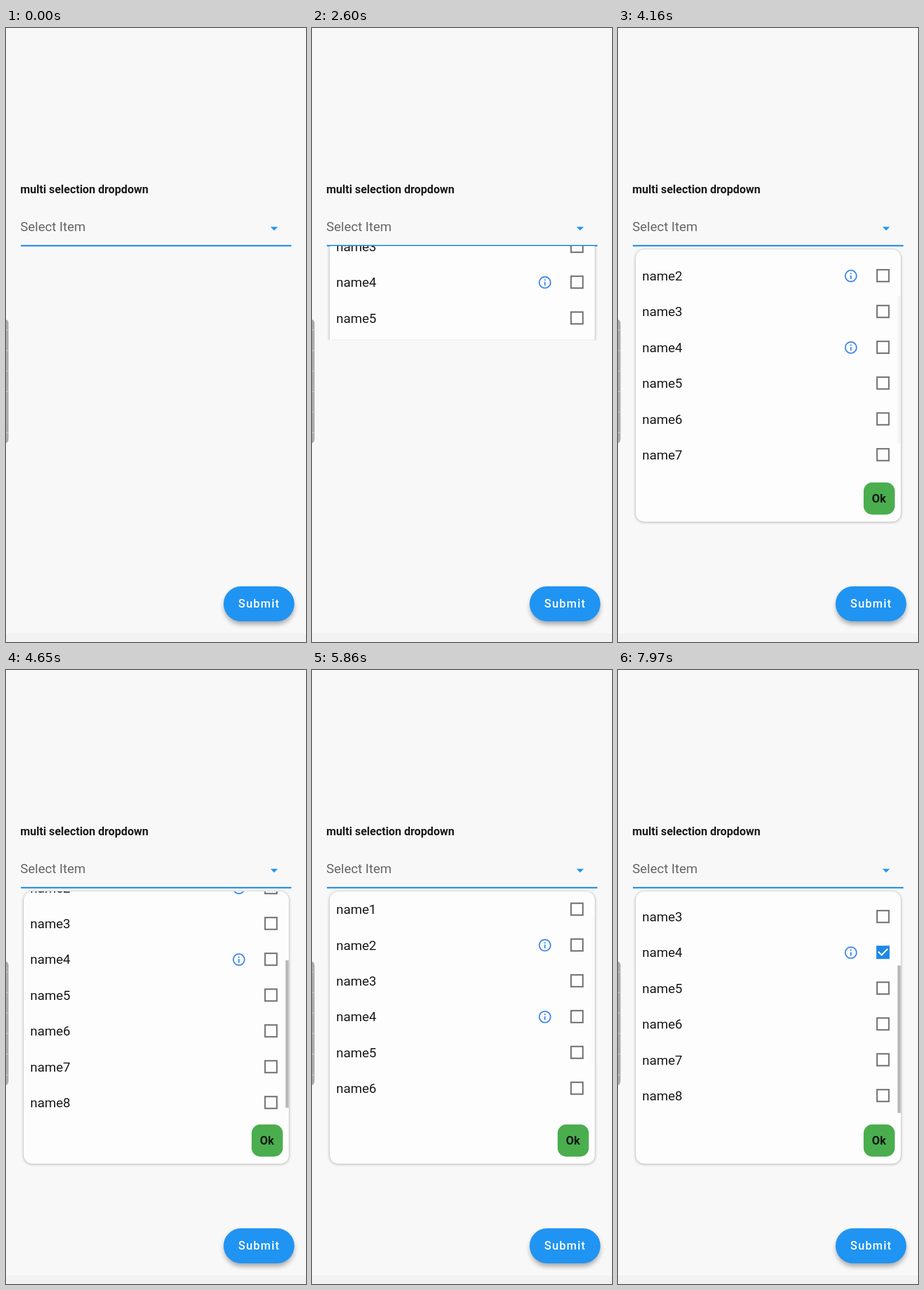
An HTML page that plays this animation: 524 px wide and 1070 px high, repeating every 8 s.

```html
<!DOCTYPE html>
<html lang="en">
<head>
<meta charset="utf-8">
<title>Multi selection dropdown</title>
<style>
  html, body { margin: 0; width: 100%; height: 100%; overflow: hidden; background: #f8f8f9; }
  svg { display: block; width: 100%; height: 100%; }
  text { font-family: Roboto, "Noto Sans", sans-serif; fill: #1b1b1b; }
</style>
</head>
<body>
<svg viewBox="0 0 524 1070" preserveAspectRatio="none">
  <defs>
    <filter id="soft" x="-20%" y="-20%" width="140%" height="140%"><feGaussianBlur stdDeviation="2.5"/></filter>
    <filter id="lift" x="-30%" y="-50%" width="160%" height="200%"><feGaussianBlur stdDeviation="4.5"/></filter>
    <clipPath id="reveal"><rect id="revealBox" x="26" y="380" width="472.5" height="0"/></clipPath>
    <clipPath id="view"><rect x="31" y="386" width="463" height="386"/></clipPath>
    <clipPath id="card"><rect x="31" y="386" width="463" height="474.5" rx="15"/></clipPath>
  </defs>

  <rect width="524" height="1070" fill="#f8f8f9"/>
  <rect y="1055" width="524" height="15" fill="#f2f2f2"/>

  <path d="M0 508Q4.5 509 4.5 516V715Q4.5 722 0 723.5Z" fill="#ababab"/>
  <path d="M0 526.5H4.5M0 562H4.5M0 598H4.5M0 633.5H4.5M0 705.5H4.5" stroke="#d6d6d6"/>
  <path id="notch" d="M0 669.5H4.5" stroke="#d6d6d6"/>

  <text x="25" y="288" font-size="19.7" font-weight="700">multi selection dropdown</text>
  <text x="25" y="354" font-size="22.8" style="fill:#666">Select Item</text>
  <path d="M462 346.5H474.7L468.3 352.9Z" fill="#2196f3"/>
  <rect x="26" y="378" width="472.5" height="2.7" fill="#2a92e8"/>

  <g clip-path="url(#reveal)">
    <g id="panel">
      <rect x="31" y="387" width="463" height="474" rx="15" fill="#888" opacity=".8" filter="url(#soft)"/>
      <rect x="31" y="386" width="463" height="474.5" rx="15" fill="#fdfdfd"/>
      <g clip-path="url(#view)">
        <g id="list"></g>
        <rect id="bar" x="488.3" width="5.4" height="257" fill="#000"/>
      </g>
      <g clip-path="url(#card)"><ellipse id="glow" rx="695" fill="#2196f3"/></g>
      <rect x="429" y="792" width="54.5" height="56" rx="15" fill="#4aae4e"/>
      <text x="443.6" y="826.5" font-size="20" font-weight="700" style="fill:#0e150e">Ok</text>
    </g>
  </g>

  <rect x="381" y="979" width="122" height="60" rx="30" fill="#000" opacity=".33" filter="url(#lift)"/>
  <rect x="380" y="973" width="123.7" height="61" rx="30.5" fill="#2094f2"/>
  <text x="405.8" y="1010" font-size="20" font-weight="500" letter-spacing="1.5" style="fill:#fff">Submit</text>
</svg>
<script>
const LOOP = 8000, ROW = 62.4, FULL = 486, MAX_SCROLL = 112;
const BOX = 23.2, LINE = 2.55;
const GREY = [117, 117, 117], BLUE = [30, 136, 229];
const NS = "http://www.w3.org/2000/svg";
const $ = id => document.getElementById(id);

function set(el, attrs) {
  for (const key in attrs) el.setAttribute(key, attrs[key]);
  return el;
}
function add(parent, tag, attrs) {
  return parent.appendChild(set(document.createElementNS(NS, tag), attrs));
}

const mix = (a, b, k) => a + (b - a) * k;
const ramp = (t, from, to) => Math.min(1, Math.max(0, (t - from) / (to - from)));
const easeOut = k => 1 - (1 - k) ** 2;
const smooth = k => k * k * (3 - 2 * k);

const rows = Array.from({ length: 8 }, (_, i) => {
  const y = 417 + ROW * i;
  const g = add($("list"), "g", { transform: `translate(0 ${y})` });
  add(g, "text", { x: 42.3, y: 8.2, "font-size": 22.9 }).textContent = "name" + (i + 1);
  if (i === 1 || i === 3) {
    const icon = add(g, "g", { transform: "translate(406.8 .3)" });
    add(icon, "circle", { r: 9.8, fill: "none", stroke: "#4088ee", "stroke-width": 2.1 });
    add(icon, "path", { d: "M0 -5.4V-3.2M0 -1.1V5.4", stroke: "#4088ee", "stroke-width": 2.2 });
  }
  const box = add(g, "g", { transform: "translate(462.8 -.2)" });
  return {
    frame: add(box, "rect", { fill: "none" }),
    tick: add(box, "path", { fill: "none", stroke: "#fff", "stroke-width": LINE })
  };
});

// The box shrinks and fills in the first half, then the tick is drawn.
function drawCheck({ frame, tick }, k) {
  const size = BOX * (1 - (1 - Math.abs(k - .5) * 2) / 9);
  const border = Math.min(size / 2, LINE + size * k);
  const side = size - border;
  const hue = GREY.map((c, i) => Math.round(mix(c, BLUE[i], Math.min(1, k * 4))));
  set(frame, {
    x: -side / 2, y: -side / 2, width: side, height: side,
    stroke: `rgb(${hue})`, "stroke-width": border
  });
  const at = (x, y) => `${(x - .5) * BOX} ${(y - .5) * BOX}`;
  const draw = (k - .5) * 2;
  const a = ramp(draw, 0, .5), b = ramp(draw, .5, 1);
  let d = "";
  if (a > 0) d = `M${at(.15, .45)}L${at(mix(.15, .4, a), mix(.45, .7, a))}`;
  if (b > 0) d += `L${at(mix(.4, .85, b), mix(.7, .25, b))}`;
  tick.setAttribute("d", d);
}

function render(t) {
  const open = easeOut(ramp(t, 850, 1210)) - easeOut(ramp(t, 2450, 2810)) + easeOut(ramp(t, 3300, 3660));
  const height = FULL * open;
  $("revealBox").setAttribute("height", height);
  $("panel").setAttribute("transform", `translate(0 ${(height - FULL) / 2})`);
  $("notch").setAttribute("opacity", t < 850 ? 0 : 1);

  const scroll = MAX_SCROLL * (easeOut(ramp(t, 4095, 4368)) - smooth(ramp(t, 4600, 4850)) + easeOut(ramp(t, 7610, 7930)));
  $("list").setAttribute("transform", `translate(0 ${-scroll})`);

  const shown = smooth(ramp(t, 4095, 4395)) - smooth(ramp(t, 5600, 5900)) + smooth(ramp(t, 7610, 7910));
  set($("bar"), { y: 431 + scroll * .75, opacity: .27 * shown });

  // Overscroll glow: pulled in at the top edge, then receding.
  const pull = easeOut(ramp(t, 4850, 5050)) * (1 - easeOut(ramp(t, 5220, 5820)));
  const stretch = .47 * pull;
  set($("glow"), { cx: 355, cy: 386 - 602 * stretch, ry: 695 * stretch, opacity: .105 * pull });

  rows.forEach((row, i) => {
    const start = i === 0 ? 5950 : i === 3 ? 6710 : LOOP;
    drawCheck(row, ramp(t, start, start + 200));
  });
}

function tick() {
  render(performance.now() % LOOP);
  requestAnimationFrame(tick);
}
tick();
</script>
</body>
</html>
```
